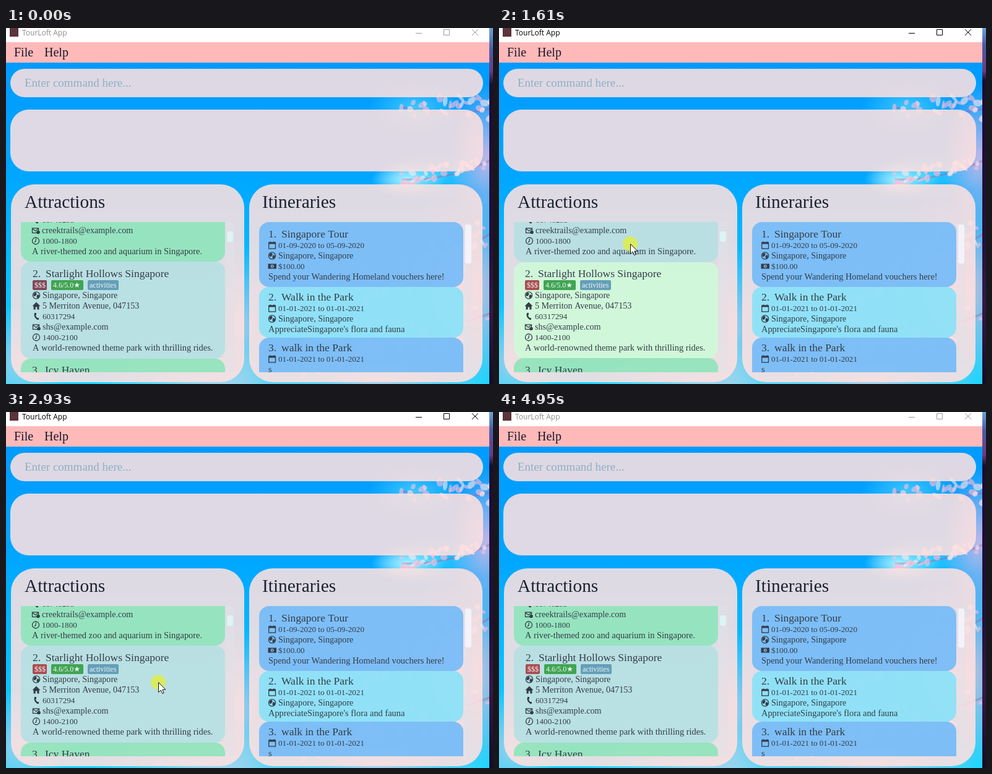
Recreate the animation shown at these times as an HTML page with a canvas. Size 787 px wide and 576 px high, loop 5030 ms.

```html
<!DOCTYPE html>
<html lang="en">
<head>
<meta charset="utf-8">
<title>Travel planner</title>
<style>
  html, body { margin: 0; width: 100%; height: 100%; overflow: hidden; background: #009dff; }
  canvas { display: block; width: 787px; height: 576px; }
</style>
</head>
<body>
<canvas id="stage" width="787" height="576"></canvas>
<script>
const W = 787, H = 576, LOOP = 5030, STEP = 77.45;
const stage = document.getElementById('stage');
const ctx = stage.getContext('2d');
const SERIF = '"Liberation Serif", "DejaVu Sans", serif';
const SANS = '"Open Sans", sans-serif';
const INK = '#343d48';

// Ticks at which the mouse button goes down; clicks alternate between the first two cards.
const CLICKS = [10, 18, 21, 25, 28, 31, 34, 37, 41, 45, 48, 53];
// Pointer tip: tick, x, y
const PATH = [
  [2, 782, 468], [7, 313, 376], [10, 229, 345], [13, 225, 343], [15, 226, 360],
  [18, 232, 435], [19, 230, 425], [21, 212, 349], [22, 214, 356], [25, 236, 437],
  [26, 235, 425], [28, 226, 345], [29, 228, 358], [31, 241, 437], [32, 239, 425],
  [34, 230, 346], [35, 233, 360], [37, 246, 437], [38, 246, 437], [41, 238, 347],
  [42, 240, 358], [45, 255, 436], [46, 253, 424], [48, 243, 348], [49, 246, 360],
  [52, 267, 434], [53, 268, 435], [54, 300, 433], [56, 716, 405], [57, 776, 398]
];

function rng(seed) {
  return () => (seed = (seed * 16807) % 2147483647) / 2147483647;
}

function rounded(g, x, y, w, h, r, fill) {
  g.beginPath();
  g.roundRect(x, y, w, h, r);
  g.fillStyle = fill;
  g.fill();
}

function glow(g, x, y, rx, ry, rgb, alpha) {
  g.save();
  g.translate(x, y);
  g.scale(rx, ry);
  const shade = g.createRadialGradient(0, 0, 0, 0, 0, 1);
  shade.addColorStop(0, `rgba(${rgb},${alpha})`);
  shade.addColorStop(1, `rgba(${rgb},0)`);
  g.fillStyle = shade;
  g.fillRect(-1, -1, 2, 2);
  g.restore();
}

function text(g, str, x, y, size, fill = INK, family = SERIF) {
  g.font = `${size}px ${family}`;
  g.fillStyle = fill;
  g.fillText(str, x, y);
}

function petals(g, rand, x0, y0, x1, y1, count, spread) {
  g.strokeStyle = 'rgba(185,80,150,.4)';
  g.lineWidth = 3;
  g.beginPath();
  g.moveTo(x0, y0);
  g.quadraticCurveTo((x0 + x1) / 2, (y0 + y1) / 2 + 18, x1, y1);
  g.stroke();
  for (let i = 0; i < count; i++) {
    const k = rand();
    const x = x0 + (x1 - x0) * k + (rand() - .5) * spread;
    const y = y0 + (y1 - y0) * k + (rand() - .5) * spread;
    g.fillStyle = rand() < .6 ? 'rgba(255,190,215,.6)' : 'rgba(255,235,240,.6)';
    g.beginPath();
    g.ellipse(x, y, 3 + rand() * 6, 2 + rand() * 4, rand() * 3, 0, 7);
    g.fill();
  }
}

function paintSky(g) {
  const sky = g.createLinearGradient(0, 56, 0, H);
  sky.addColorStop(0, '#009bff');
  sky.addColorStop(.35, '#00a6ff');
  sky.addColorStop(.65, '#05bdff');
  sky.addColorStop(1, '#1ad6ff');
  g.fillStyle = sky;
  g.fillRect(0, 0, W, H);
  glow(g, 660, 130, 75, 45, '90,215,255', .7);
  glow(g, 650, 245, 60, 30, '225,255,255', .95);
  glow(g, 690, 240, 90, 40, '80,225,255', .6);
  glow(g, 776, 210, 60, 120, '255,190,225', .75);
  glow(g, 380, 480, 60, 130, '255,205,220', .6);
  glow(g, 20, 540, 80, 90, '255,205,220', .55);
  glow(g, 330, 580, 190, 70, '255,215,225', .6);
  glow(g, 750, 420, 130, 160, '255,190,210', .75);
  glow(g, 600, 580, 180, 80, '255,205,220', .65);
  const rand = rng(41);
  petals(g, rand, 787, 130, 640, 128, 26, 34);
  petals(g, rand, 781, 215, 640, 245, 34, 22);
  petals(g, rand, 787, 330, 560, 440, 55, 55);
  petals(g, rand, 787, 460, 500, 540, 60, 60);
}

function paintStatic(g) {
  paintSky(g);
  g.fillStyle = '#fff';
  g.fillRect(0, 0, 781, 23);
  g.fillStyle = '#ffb9b9';
  g.fillRect(0, 23, 781, 33);
  g.fillStyle = '#5b343c';
  g.fillRect(6, 0, 14, 14);
  text(g, 'File', 13, 46, 20, '#1a1a2a');
  text(g, 'Help', 62, 46, 20, '#1a1a2a');

  const panel = 'rgba(255,226,225,.87)';
  rounded(g, 7, 66, 764, 46, 23, panel);
  rounded(g, 7, 132, 764, 100, 30, panel);
  rounded(g, 8, 253, 377, 320, 38, panel);
  rounded(g, 393, 253, 377, 320, 38, panel);
  text(g, 'Enter command here...', 30, 95, 19, '#8fb0c3');
  text(g, 'Attractions', 30, 291, 29.3, '#1b2230');
  text(g, 'Itineraries', 414, 291, 29.4, '#1b2230');

  g.fillStyle = 'rgba(225,225,232,.45)';
  g.fillRect(354, 314, 15, 243);
  g.fillRect(739, 314, 15, 243);
  rounded(g, 357, 329, 10, 17, 3, '#dcf4f5');
  rounded(g, 742, 318, 10, 63, 3, 'rgba(245,248,255,.75)');
  paintItineraries(g);
}

// Small 13px icons, placed by left edge and text baseline.
const ICONS = {
  globe(g) {
    g.beginPath(); g.arc(6, 6, 5.6, 0, 7); g.stroke();
    g.beginPath();
    g.ellipse(4, 4.5, 2.2, 3.2, .5, 0, 7);
    g.ellipse(8.6, 7.6, 2, 2.8, .3, 0, 7);
    g.fill();
  },
  home(g) {
    g.beginPath();
    g.moveTo(6, 0); g.lineTo(12.5, 6.5); g.lineTo(10.5, 6.5); g.lineTo(10.5, 12);
    g.lineTo(7.3, 12); g.lineTo(7.3, 8); g.lineTo(4.7, 8); g.lineTo(4.7, 12);
    g.lineTo(1.5, 12); g.lineTo(1.5, 6.5); g.lineTo(-.5, 6.5);
    g.fill();
  },
  phone(g) {
    g.lineWidth = 2.4;
    g.beginPath(); g.moveTo(4, 1.5); g.quadraticCurveTo(2.5, 7, 8.8, 10.8); g.stroke();
    g.fillRect(3, .5, 3, 3.2);
    g.fillRect(7, 8.5, 3, 3);
  },
  mail(g) {
    g.strokeRect(.5, 2.5, 10, 7.5);
    g.beginPath(); g.moveTo(.5, 3); g.lineTo(5.5, 7); g.lineTo(10.5, 3); g.stroke();
    g.beginPath(); g.arc(10, 9, 2.8, 0, 7); g.fill();
  },
  clock(g) {
    g.beginPath(); g.arc(6, 6, 5.5, 0, 7); g.stroke();
    g.beginPath(); g.moveTo(6.5, 2.5); g.lineTo(6, 6.5); g.lineTo(4.2, 8.5); g.stroke();
  },
  date(g) {
    g.strokeRect(.7, 1.7, 10.8, 9.8);
    g.fillRect(.5, 1, 11.5, 3);
    g.fillRect(2.5, 0, 1.6, 2);
    g.fillRect(8.2, 0, 1.6, 2);
  },
  cash(g) {
    g.fillRect(-.5, 2, 13.5, 8);
    g.fillStyle = '#8fc0ee';
    g.beginPath(); g.ellipse(6.2, 6, 2.4, 2.8, 0, 0, 7); g.fill();
    g.fillStyle = INK;
    g.fillRect(5.6, 4.2, 1.4, 3.6);
  }
};

function row(g, icon, str, x, y) {
  if (icon) {
    g.save();
    g.translate(x, y - 10.5);
    g.fillStyle = g.strokeStyle = INK;
    g.lineWidth = 1.3;
    ICONS[icon](g);
    g.restore();
  }
  const numeric = /^(\d\d|\$)/.test(str);
  text(g, str, icon ? x + 16 : x, y, numeric ? 13.1 : icon ? 14.1 : 14.4);
}

function heading(g, num, str, x, y) {
  text(g, num + '.', x, y, 17.5);
  text(g, str, x + 21, y, 17.5);
}

function rows(g, x, y, list) {
  list.forEach(([icon, str], i) => row(g, icon, str, x, y + i * 17));
}

function paintItineraries(g) {
  const deep = 'rgba(112,186,250,.88)', pale = 'rgba(134,226,250,.88)';
  g.save();
  g.beginPath();
  g.rect(409, 314, 330, 243);
  g.clip();
  rounded(g, 409, 314, 330, 105, 16, deep);
  rounded(g, 409, 419, 330, 82, 16, pale);
  rounded(g, 409, 501, 330, 90, 16, deep);
  heading(g, 1, 'Singapore Tour', 424, 339);
  rows(g, 424, 356, [
    ['date', '01-09-2020 to 05-09-2020'],
    ['globe', 'Singapore, Singapore'],
    ['cash', '$100.00'],
    ['', 'Spend your Wandering Homeland vouchers here!']
  ]);
  heading(g, 2, 'Walk in the Park', 424, 441);
  rows(g, 424, 458, [
    ['date', '01-01-2021 to 01-01-2021'],
    ['globe', 'Singapore, Singapore'],
    ['', "AppreciateSingapore's flora and fauna"]
  ]);
  heading(g, 3, 'walk in the Park', 424, 523);
  rows(g, 424, 540, [['date', '01-01-2021 to 01-01-2021'], ['', 's']]);
  g.restore();
}

function tag(g, str, x, w, fill) {
  rounded(g, x, 408, w, 16, 2, fill);
  text(g, str, x + 3, 420, 12, '#f4f4f4');
}

function paintAttractions(g, firstChosen, focused) {
  const green = 'rgba(140,229,186,.88)', mint = 'rgba(207,250,217,.9)', chosen = 'rgba(181,224,228,.9)';
  const top = firstChosen ? 379 : 378, bottom = firstChosen ? 534 : 535;
  const x1 = firstChosen ? 43 : 42, x2 = firstChosen ? 42 : 43;
  g.save();
  g.beginPath();
  g.rect(24, 314, 330, 243);
  g.clip();
  rounded(g, 24, 230, 330, top - 230, 16, firstChosen ? chosen : green);
  rounded(g, 24, top, 330, bottom - top, 16, firstChosen ? mint : chosen);
  rounded(g, 24, bottom, 330, 100, 16, green);
  rows(g, x1, 315, [
    ['phone', '61740293'],
    ['mail', 'creektrails@example.com'],
    ['clock', '1000-1800'],
    ['', 'A river-themed zoo and aquarium in Singapore.']
  ]);
  heading(g, 2, 'Starlight Hollows Singapore', x2, 403);
  tag(g, '$$$', x2, 23, focused ? '#aa4d50' : '#7e4858');
  tag(g, '4.6/5.0★', x2 + 30, 52, '#3fa552');
  tag(g, 'activities', x2 + 89, 50, '#639fb9');
  rows(g, x2, 437, [
    ['globe', 'Singapore, Singapore'],
    ['home', '5 Merriton Avenue, 047153'],
    ['phone', '60317294'],
    ['mail', 'shs@example.com'],
    ['clock', '1400-2100'],
    ['', 'A world-renowned theme park with thrilling rides.']
  ]);
  heading(g, 3, 'Icy Haven', 42, 559);
  g.restore();
}

function paintTitle(g, active) {
  const shade = active ? '#000' : '#999';
  text(g, 'TourLoft App', 26, 12, 12, active ? '#000' : '#8c8c8c', SANS);
  g.strokeStyle = shade;
  g.lineWidth = 1;
  g.beginPath();
  g.moveTo(662, 8.5); g.lineTo(672, 8.5);
  g.rect(707.5, 2.5, 9, 9);
  g.moveTo(753, 2); g.lineTo(763, 12);
  g.moveTo(763, 2); g.lineTo(753, 12);
  g.stroke();
}

// Sliver of moving wallpaper beside the window.
function paintEdge(g, tick) {
  const sway = Math.sin(tick * Math.PI * 2 / 13);
  const shade = g.createLinearGradient(0, 0, 0, H);
  shade.addColorStop(0, '#6fa3d4');
  shade.addColorStop(.06 + sway * .02, '#4a5ca8');
  shade.addColorStop(.12, '#6b3c86');
  shade.addColorStop(.16 + sway * .02, '#1c0d30');
  shade.addColorStop(.6, '#24103a');
  shade.addColorStop(.8 + sway * .05, '#351848');
  shade.addColorStop(1, '#170b26');
  g.fillStyle = shade;
  g.fillRect(781, 0, 6, H);
}

function pointerAt(tick) {
  const i = PATH.findIndex(p => p[0] >= tick);
  if (i < 0 || tick < PATH[0][0]) return null;
  if (PATH[i][0] === tick) return PATH[i].slice(1);
  const a = PATH[i - 1], b = PATH[i];
  const k = (tick - a[0]) / (b[0] - a[0]);
  return [a[1] + (b[1] - a[1]) * k, a[2] + (b[2] - a[2]) * k];
}

function paintPointer(g, tick) {
  const tip = pointerAt(tick);
  if (!tip) return;
  g.save();
  g.translate(Math.round(tip[0]), Math.round(tip[1]));
  if (CLICKS.some(c => tick >= c && tick <= c + 1)) {
    g.fillStyle = 'rgba(222,236,76,.86)';
    g.beginPath();
    g.arc(0, 0, 12, 0, 7);
    g.fill();
  }
  g.translate(.5, .5);
  g.beginPath();
  g.moveTo(0, 0); g.lineTo(0, 16); g.lineTo(3.7, 12.6); g.lineTo(6.2, 18);
  g.lineTo(8.6, 17); g.lineTo(6.3, 11.6); g.lineTo(11.4, 11.6);
  g.closePath();
  g.fillStyle = '#fff';
  g.strokeStyle = '#111';
  g.lineWidth = 1;
  g.fill();
  g.stroke();
  g.restore();
}

const backdrop = document.createElement('canvas');
backdrop.width = W;
backdrop.height = H;
paintStatic(backdrop.getContext('2d'));

function draw(now) {
  const tick = Math.min(64, Math.floor((now % LOOP + 17) / STEP));
  const clicks = CLICKS.filter(c => c <= tick).length;
  const active = clicks > 0 && tick < 64;
  ctx.drawImage(backdrop, 0, 0);
  paintAttractions(ctx, clicks % 2 === 1, clicks > 0);
  paintTitle(ctx, active);
  paintEdge(ctx, tick);
  paintPointer(ctx, tick);
}

const start = performance.now();
function loop() {
  draw(performance.now() - start);
  requestAnimationFrame(loop);
}
loop();
</script>
</body>
</html>
```
